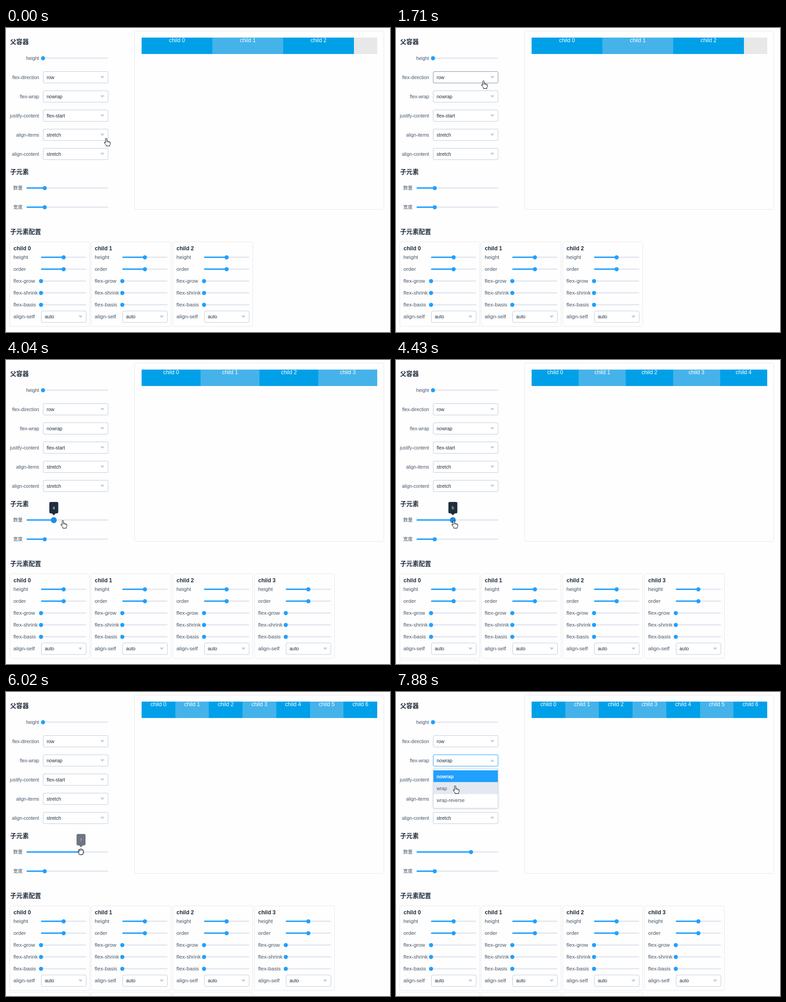
Animation of 841x666 px, one loop 8000 ms. Source, as an HTML page with a canvas:

```html
<!DOCTYPE html>
<html lang="zh">
<head>
<meta charset="utf-8">
<title>Flex playground</title>
<style>
html, body { margin: 0; width: 100%; height: 100%; overflow: hidden; background: #fefefe; }
canvas { display: block; }
</style>
</head>
<body>
<canvas id="stage" width="841" height="666"></canvas>
<script>
const ctx = document.getElementById('stage').getContext('2d');
const LOOP = 8000;
const BLUE = '#20a0ff', DARK = '#1f2d3d', LABEL = '#48576a', LINE = '#bfcbd9', TRACK = '#e4e8f1', PALE = '#e8e8e8';
const SANS = '"Liberation Sans", Arial, sans-serif';
const CJK = '"Noto Sans CJK SC", "Noto Sans CJK", sans-serif';

// Bursts of screen updates: start, end, number of steps
const BURSTS = [
  [150, 1080, 8], [1200, 1710, 5], [2360, 3350, 8], [3500, 4430, 8],
  [4550, 4910, 4], [5190, 5490, 3], [6020, 6950, 8], [7070, 7880, 7]
];
// Pointer path: time, x, y
const PATH = [
  [0, 219, 241], [60, 219, 241], [1080, 193, 152], [1710, 191, 115], [2230, 191, 115],
  [3350, 84, 350], [3400, 85, 350], [4030, 124, 351], [4430, 126, 351], [4790, 149, 351],
  [5060, 149, 351], [5490, 163, 349], [6020, 163, 349], [6950, 150, 115],
  [7190, 142, 152], [7340, 142, 152], [7880, 129, 205]
];
// Moments at which a child is added
const ADDED = [3760, 4150, 4660, 5310];
const SELECTS = [
  ['flex-direction', 'row'], ['flex-wrap', 'nowrap'], ['justify-content', 'flex-start'],
  ['align-items', 'stretch'], ['align-content', 'stretch']
];
const CARD_ROWS = [['height', .5], ['order', .5], ['flex-grow', 0], ['flex-shrink', 0], ['flex-basis', 0]];
const OPEN_AT = 7460;

function snap(t) {
  let s = 0;
  for (const [a, b, n] of BURSTS) {
    if (t < a) break;
    const gap = (b - a) / (n - 1);
    s = a + gap * Math.min(n - 1, Math.floor((t - a + 20) / gap));
  }
  return s;
}

function pointerAt(t) {
  let i = 1;
  while (i < PATH.length - 1 && PATH[i][0] < t) i++;
  const [t0, x0, y0] = PATH[i - 1], [t1, x1, y1] = PATH[i];
  const k = Math.min(1, (t - t0) / (t1 - t0));
  return { x: Math.round(x0 + (x1 - x0) * k), y: Math.round(y0 + (y1 - y0) * k) };
}

function text(str, x, y, size, color, align = 'left', bold = false, family = SANS) {
  ctx.font = `${bold ? 'bold ' : ''}${size}px ${family}`;
  ctx.textAlign = align;
  ctx.fillStyle = color;
  ctx.fillText(str, x, y);
}

function rect(x, y, w, h, color) {
  ctx.fillStyle = color;
  ctx.fillRect(x, y, w, h);
}

function box(x, y, w, h, r, stroke, fill) {
  ctx.beginPath();
  ctx.roundRect(x, y, w, h, r);
  if (fill) { ctx.fillStyle = fill; ctx.fill(); }
  if (stroke) { ctx.strokeStyle = stroke; ctx.lineWidth = 1; ctx.stroke(); }
}

function triangle(x, y, w, h, color) {
  ctx.beginPath();
  ctx.moveTo(x - w / 2, y - h / 2);
  ctx.lineTo(x + w / 2, y - h / 2);
  ctx.lineTo(x, y + h / 2);
  ctx.fillStyle = color;
  ctx.fill();
}

function slider(x, y, w, value, lit) {
  const knob = x + w * value;
  box(x, y - 1.5, w, 3, 1.5, null, TRACK);
  if (value) box(x, y - 1.5, w * value, 3, 1.5, null, BLUE);
  ctx.beginPath();
  ctx.arc(knob, y + .3, lit ? 6.5 : 4.5, 0, 7);
  ctx.fillStyle = lit ? '#1c8de0' : BLUE;
  ctx.fill();
}

function select(x, y, w, value, border, open) {
  box(x, y - 12.5, w, 25, 2.5, border, '#fff');
  text(value, x + 7.5, y + 3.7, 10.5, DARK);
  triangle(x + w - 12.5, y, 9, open ? -5 : 5, LINE);
}

function heading(str, y) {
  text(str, 9, y + 5, 13.6, DARK, 'left', true, CJK);
}

function parentForm(mouse, open) {
  heading('父容器', 30);
  text('height', 72.5, 69.7, 10.4, LABEL, 'right');
  slider(81, 66, 142.5, 0);
  SELECTS.forEach(([name, value], i) => {
    const y = 108 + 42 * i, isOpen = open && i === 1;
    const over = !open && mouse.x > 81 && mouse.x < 218 && Math.abs(mouse.y - y) < 13;
    text(name, 72.5, y + 3.7, 10.4, LABEL, 'right');
    select(81.5, y, 142, value, isOpen ? BLUE : over ? '#8391a5' : LINE, isOpen);
  });
}

function childForm(count, lit) {
  heading('子元素', 314.5);
  text('数量', 36.5, 354.3, 10.4, LABEL, 'right', false, CJK);
  slider(45, 350.5, 179, (count - 1) / 9, lit);
  text('宽度', 36.5, 396.3, 10.4, LABEL, 'right', false, CJK);
  slider(45, 392.5, 179, 2 / 9);
}

function preview(count) {
  box(281.5, 6.5, 546, 391, 3, PALE);
  rect(297, 21, 516, 36, PALE);
  const w = Math.min(155, 516 / count);
  for (let i = 0; i < count; i++) {
    const x = Math.round(297 + w * i), end = Math.round(297 + w * (i + 1));
    rect(x, 21, end - x, 36, i % 2 ? '#45b3ea' : '#00a0e9');
    text('child ' + i, 297 + w * (i + .5), 31.3, 12, '#fff', 'center');
  }
}

function card(i) {
  const x = Math.round(8.6 + 178.75 * (i % 4)), y = 468.5 + 189 * Math.floor(i / 4);
  box(x - .5, y, 175, 185, 3, PALE);
  text('child ' + i, x + 7.5, y + 18, 12, DARK, 'left', true);
  CARD_ROWS.forEach(([name, value], r) => {
    const cy = y + 33.7 + 26 * r;
    text(name, x + 7.3, cy + 4, 11.7, LABEL);
    slider(x + 67.7, cy, 99, value);
  });
  text('align-self', x + 7.3, y + 167.8, 11.7, LABEL);
  select(x + 68.5, y + 164, 98, 'auto', LINE);
}

function tooltip(count, alpha) {
  const x = 45 + 179 * (count - 1) / 9;
  ctx.globalAlpha = alpha;
  box(x - 9.8, 311, 19.6, 25, 3, null, DARK);
  triangle(x, 338, 9, 4.5, DARK);
  text(count, x, 327.3, 9, '#fff', 'center');
  ctx.globalAlpha = 1;
}

function dropdown(mouse, age) {
  const k = Math.min(1, .35 + age / 300);
  ctx.save();
  ctx.globalAlpha = k;
  ctx.translate(0, 167);
  ctx.scale(1, k);
  ctx.translate(0, -167);
  ctx.shadowColor = 'rgba(0,0,0,.14)';
  ctx.shadowBlur = 4;
  ctx.shadowOffsetY = 1;
  box(81.5, 167.5, 142, 87, 2, '#d1dbe5', '#fff');
  ctx.shadowColor = 'transparent';
  ['nowrap', 'wrap', 'wrap-reverse'].forEach((name, i) => {
    const y = 171.5 + 26.1 * i, chosen = i === 0;
    const over = mouse.y >= y && mouse.y < y + 26;
    if (chosen || over) rect(82, y, 141, 26.1, chosen ? BLUE : TRACK);
    text(name, 89, y + 17, 10.5, chosen ? '#fff' : LABEL, 'left', chosen);
  });
  ctx.restore();
}

const HAND = new Path2D('M-1.5 10V1.6Q-1.5 0 0 0T1.5 1.6V6Q4 5.4 4.3 7Q6.5 6.4 6.8 8Q8.8 7.8 8.8 9.6V12Q8.6 14 7.5 15V17H0V15.3Q-2 13 -4.3 9.8Q-4.4 8 -2.6 8.8Z');
const HAND_LINES = new Path2D('M1.5 6V9M4.3 7V9.5M6.8 8V10');
const FIST = new Path2D('M-4.5 -2Q-4 -4.6 -1.8 -4Q-.5 -5.5 1 -4Q2.8 -5 3.5 -3.2Q5.6 -3.4 5.5 -1V1.5Q5 3.5 4 5.5H-2.5Q-3.2 3.8 -5 1.8Q-5.8 -.4 -4 -.4Z');
const FIST_LINES = new Path2D('M-1.8 -4V-2M1 -4V-2M3.5 -3.2V-1.6');
const PALM = new Path2D('M-3 1.5L-4.8 -3.6Q-4.2 -5.6 -2.8 -4.2L-1.8 -1.5V-5Q-.8 -7 .6 -5.4Q2.6 -6.8 3.3 -4.4Q5.8 -5 5.8 -2.4V2Q5.2 4 4.2 6.8H-2.3Q-3.6 4 -6 1.6Q-6 -.4 -4.4 .3Z');
const PALM_LINES = new Path2D('M.6 -5.4V-1M3.3 -4.4V-1');

function pointer(mouse, shape, lines) {
  ctx.save();
  ctx.translate(mouse.x + .5, mouse.y + .5);
  ctx.lineJoin = 'round';
  ctx.fillStyle = '#fff';
  ctx.strokeStyle = '#000';
  ctx.lineWidth = 1;
  ctx.fill(shape);
  ctx.stroke(shape);
  ctx.lineWidth = .8;
  ctx.stroke(lines);
  ctx.restore();
}

function draw(now) {
  const t = snap(now % LOOP);
  const mouse = pointerAt(t);
  const count = 3 + ADDED.filter(a => t >= a).length;
  const open = t >= OPEN_AT;
  const lit = t >= 3340 && t <= 6020;

  rect(0, 0, 841, 666, '#fefefe');
  parentForm(mouse, open);
  childForm(count, lit);
  preview(count);
  heading('子元素配置', 445.5);
  for (let i = 0; i < count; i++) card(i);
  if (lit) tooltip(count, t === 6020 ? .65 : 1);
  if (open) dropdown(mouse, t - OPEN_AT);

  if (t >= 4550 && t < 5480) pointer(mouse, FIST, FIST_LINES);
  else if (t >= 5480 && t <= 6020) pointer(mouse, PALM, PALM_LINES);
  else pointer(mouse, HAND, HAND_LINES);
}

const start = performance.now();
function tick() {
  draw(performance.now() - start);
  requestAnimationFrame(tick);
}
tick();
</script>
</body>
</html>
```
